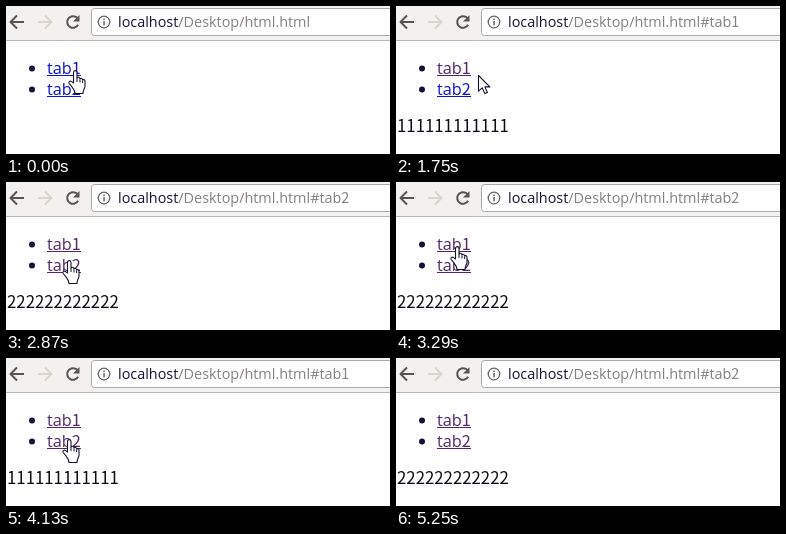
An HTML page with a canvas that plays this animation: 384x148 px, repeating every 6020 ms.

```html
<!DOCTYPE html>
<html lang="en">
<head>
<meta charset="utf-8">
<title>Tabs by URL hash</title>
<style>
html, body { margin: 0; width: 100%; height: 100%; overflow: hidden; background: #fff; }
canvas { display: block; width: 384px; height: 148px; }
</style>
</head>
<body>
<canvas id="stage" width="384" height="148"></canvas>
<script>
const ctx = document.getElementById('stage').getContext('2d');
const LOOP = 6020, STEP = 70;
const LETTERS = '"Open Sans", sans-serif';
const DIGITS = '"Noto Sans CJK SC", "Noto Sans CJK", sans-serif';
const BLUE = '#0a14c8', PURPLE = '#50286e', RED = '#f00a14';

// Each entry holds until the next one: time, shape, left, top.
const cursorKeys = [
  [0, 'hand', 62, 64], [1750, 'arrow', 82, 69], [1820, 'arrow', 102, 73],
  [2030, 'arrow', 96, 76], [2100, 'arrow', 86, 80], [2170, 'hand', 66, 82],
  [2240, 'hand', 60, 83], [2310, 'hand', 56, 83],
  [2800, 'hand', 56, 81], [2870, 'hand', 56, 78], [2940, 'hand', 55, 72], [3010, 'hand', 55, 67],
  [3220, 'hand', 55, 65], [3290, 'hand', 54, 64], [3360, 'hand', 54, 63],
  [3780, 'hand', 53, 65], [3850, 'hand', 53, 70], [3920, 'hand', 54, 75], [3990, 'hand', 56, 79],
  [4130, 'hand', 56, 81], [4200, 'hand', 56, 83], [4270, 'hand', 56, 86],
  [5040, 'arrow', 90, 100], [5110, 'arrow', 160, 122], [5180, 'arrow', 232, 138],
  [5250, 'none', 0, 0]
];
const pageKeys = [[0, 0], [1400, 1], [2520, 2], [3570, 1], [4830, 2]];
const presses = [[1, 1330, 1470], [2, 2450, 2660], [1, 3430, 3570], [2, 4760, 4830]];
const firstVisit = { 1: 1400, 2: 2520 };

const handShape = new Path2D(
  'M5.5 13V2.5C5.5 0 9 0 9 2.5V8C9.6 6.8 12 7 12 9C12.8 7.9 14.6 8.3 14.6 10' +
  'C15.6 9.2 17 9.8 17 11.3V16C17 18.5 15 19.5 15 23.5H7C7 20.5 5.5 19.5 4.2 17.2' +
  'L1.2 13.5C0 11.6 2.2 10.4 3.6 11.6Z');
const handFolds = new Path2D('M9 8V12M12 9.5V12.5M14.6 10.5V13');
const arrowShape = new Path2D('M.5 .5V16.2L4.2 12.8L6.8 18.6L9.4 17.5L6.9 11.9H11.8Z');

const current = (keys, t) => keys.findLast(key => key[0] <= t);

function write(text, x, y, size, color) {
  ctx.fillStyle = color;
  for (const run of text.match(/\d+|\D+/g)) {
    ctx.font = `${size}px ${/\d/.test(run) ? DIGITS : LETTERS}`;
    ctx.fillText(run, x, y);
    x += ctx.measureText(run).width;
  }
  return x;
}

function stroke(path, color, width) {
  ctx.strokeStyle = color;
  ctx.lineWidth = width;
  ctx.stroke(path);
}

function disc(x, y, r, color) {
  ctx.fillStyle = color;
  ctx.beginPath();
  ctx.arc(x, y, r, 0, Math.PI * 2);
  ctx.fill();
}

function drawToolbar(page) {
  ctx.fillStyle = '#f2f1f0';
  ctx.fillRect(0, 0, 384, 34);
  ctx.fillStyle = '#b9b7b5';
  ctx.fillRect(0, 34, 384, 1);

  stroke(new Path2D('M18 16H5M11 9.5L4.5 16L11 22.5'), '#555', 2);
  stroke(new Path2D('M32 16H45M39 9.5L45.5 16L39 22.5'), '#ddd5cc', 2);
  const reload = new Path2D();
  reload.arc(67, 16, 5.8, 0.5, Math.PI * 1.75);
  stroke(reload, '#555', 2);
  ctx.fillStyle = '#555';
  ctx.fill(new Path2D('M73.5 9V15.5H67Z'));

  const box = new Path2D();
  box.roundRect(85.5, 2.5, 320, 27, 3);
  ctx.fillStyle = '#fff';
  ctx.fill(box);
  stroke(box, '#aaa8a6', 1);

  const info = new Path2D();
  info.arc(98, 16, 5.8, 0, Math.PI * 2);
  stroke(info, '#666', 1.3);
  ctx.fillStyle = '#666';
  ctx.fillRect(97.3, 12.5, 1.5, 1.5);
  ctx.fillRect(97.3, 15, 1.5, 4.3);

  const x = write('localhost', 112, 21, 14.4, '#16142e');
  write('/Desktop/html.html' + (page ? '#tab' + page : ''), x, 21, 14.4, '#85817f');
}

function drawLink(n, t) {
  const y = 47 + 21 * n;
  const pressed = presses.some(([tab, from, to]) => tab === n && t >= from && t < to);
  const color = pressed ? RED : t >= firstVisit[n] ? PURPLE : BLUE;
  disc(26, y - 5.5, 3, '#14123a');
  const end = write('tab' + n, 41, y, 16.3, color);
  ctx.fillRect(41, y + 1, Math.round(end) - 41, 1);
}

function drawCursor([, shape, x, y]) {
  if (shape === 'none') return;
  const outline = shape === 'hand' ? handShape : arrowShape;
  ctx.save();
  ctx.translate(x, y);
  ctx.fillStyle = '#fff';
  ctx.fill(outline);
  stroke(outline, '#14122a', 1.1);
  if (shape === 'hand') stroke(handFolds, '#14122a', 1);
  ctx.restore();
}

function draw(now) {
  const t = Math.floor((now % LOOP) / STEP) * STEP;
  const page = current(pageKeys, t)[1];
  ctx.fillStyle = '#fff';
  ctx.fillRect(0, 0, 384, 148);
  ctx.lineJoin = 'round';
  drawToolbar(page);
  drawLink(1, t);
  drawLink(2, t);
  if (page) write(String(page).repeat(12), 1, 126, 16.8, '#0c0a14');
  drawCursor(current(cursorKeys, t));
}

let start;
function tick(now) {
  start ??= now;
  draw(now - start);
  requestAnimationFrame(tick);
}
requestAnimationFrame(tick);
</script>
</body>
</html>
```
